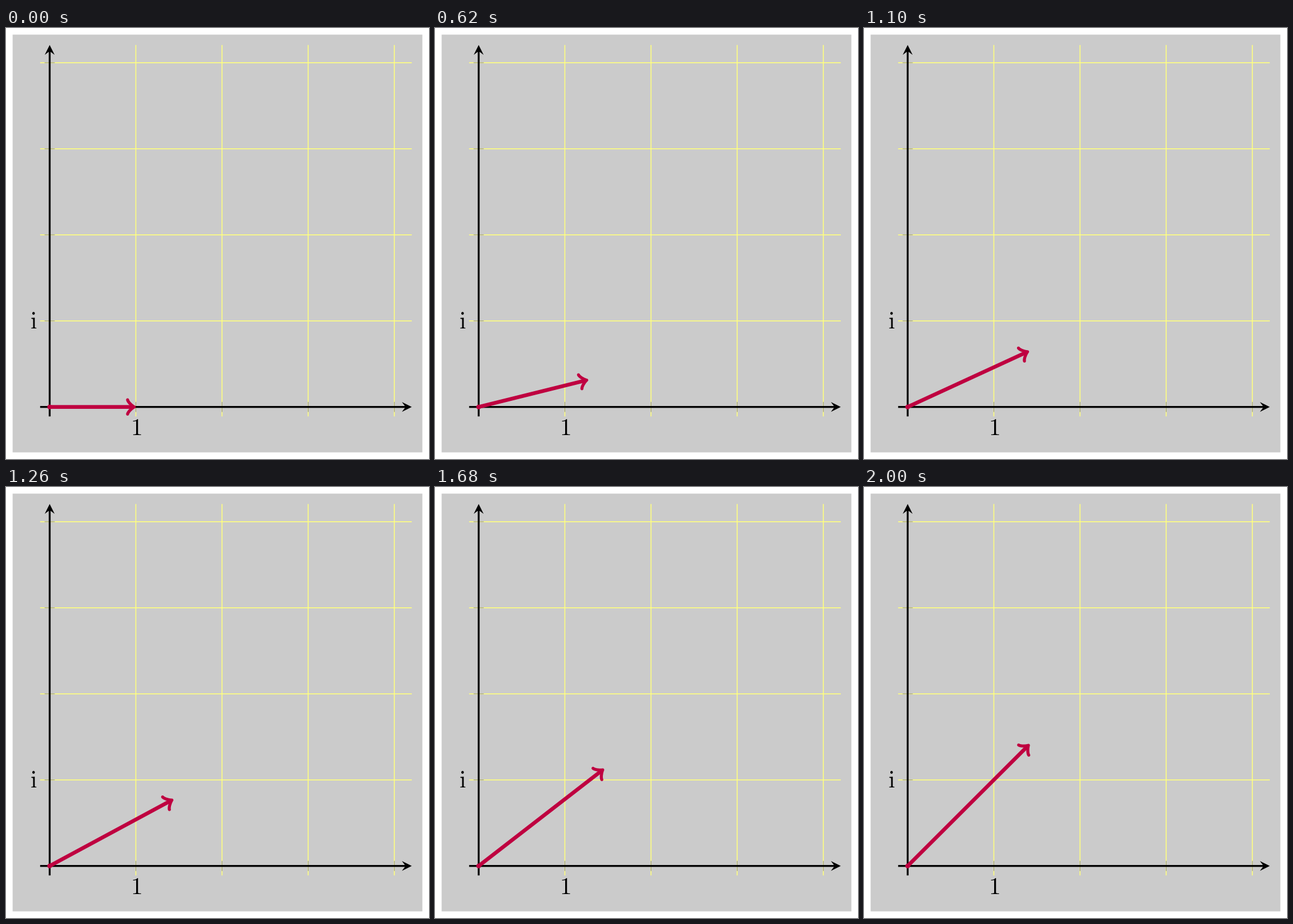
A matplotlib script that plays this animation: 741 by 756 pixels, repeating every 4 s.

```python
import numpy as np
import matplotlib.pyplot as plt
from matplotlib.animation import FuncAnimation
from matplotlib.patches import Circle, PathPatch, Polygon, Rectangle
from matplotlib.path import Path

W, H, DPI = 741, 756, 100
PT = 300 / 72.27                  # pixels per drawing point
OX, OY, UNIT = 76.5, 664.7, 150.95
LEFT, RIGHT, TOP, BOTTOM = 59.8, 710.8, 29.8, 681.3
MOVE, FRAMES, STEP = 100, 200, 20

RED = (0.75, 0, 0.25)
YELLOW = (1, 1, 0.5)
GRAY = (0.5, 0.5, 0.5)

plt.rcParams["mathtext.fontset"] = "cm"
plt.rcParams["path.snap"] = False

fig = plt.figure(figsize=(W / DPI, H / DPI), dpi=DPI, facecolor="white")
ax = fig.add_axes([0, 0, 1, 1])
ax.set_xlim(0, W)
ax.set_ylim(H, 0)
ax.axis("off")


def px(width):
    """Pixels to the points matplotlib measures in."""
    return width * 72 / DPI


def line(x0, y0, x1, y1, color, width, z):
    return ax.plot([x0, x1], [y0, y1], color=color, lw=px(width * PT),
                   solid_capstyle="butt", zorder=z, snap=False)[0]


def stealth(x, y, dx, dy):
    """Filled axis arrowhead with its tip at (x, y)."""
    a = (0.28 + 0.3 * 0.8) * PT
    shape = np.array([(0, 0), (-8, 4), (-5, 0), (-8, -4)]) * a
    turn = np.array([(dx, dy), (-dy, dx)])
    ax.add_patch(Polygon(shape @ turn + (x, y), fc="black", lw=0,
                         zorder=4, snap=False))


def label(x, y, text):
    ax.text(x, y, rf"$\mathrm{{{text}}}$", fontsize=px(10 * PT),
            ha="center", va="baseline", zorder=5)


ax.add_patch(Rectangle((11.6, 11.6), 717.8, 732.8, fc="#cbcbcb", lw=0,
                       zorder=0, snap=False))

tick = 8.87
for k in range(1, 5):
    x, y = OX + k * UNIT, OY - k * UNIT
    line(x, TOP, x, BOTTOM, YELLOW, 0.4, 1)
    line(LEFT, y, RIGHT, y, YELLOW, 0.4, 1)
    line(x, OY - tick, x, OY + tick, GRAY, 0.2, 2)
    line(OX - tick, y, OX + tick, y, GRAY, 0.2, 2)

line(LEFT, OY, RIGHT - 10, OY, "black", 0.8, 3)
line(OX, BOTTOM, OX, TOP + 10, "black", 0.8, 3)
stealth(RIGHT, OY, 1, 0)
stealth(OX, TOP, 0, -1)
label(OX + UNIT, 714, "1")
label(48, 527.3, "i")

# Moving vector: shaft, curved barbs and a dot at its foot
LW = 1.6
A = (0.28 + 0.3 * LW) * PT
INSET = (0.21 + 0.625 * LW) * PT
BARBS = np.array([(-3, 4), (-2.75, 2.5), (0, 0.25), (0.75, 0),
                  (0, -0.25), (-2.75, -2.5), (-3, -4)]) * A
CODES = [Path.MOVETO] + [Path.CURVE4] * 6

shaft = line(OX, OY, OX, OY, RED, LW, 6)
shaft.set_solid_capstyle("round")
head = PathPatch(Path(BARBS, CODES), fc="none", ec=RED,
                 lw=px(0.8 * LW * PT), capstyle="round",
                 joinstyle="round", zorder=6, snap=False)
ax.add_patch(head)
ax.add_patch(Circle((OX, OY), PT, fc=RED, lw=0, zorder=6, snap=False))


def draw(frame):
    t = min(frame / MOVE, 1)
    angle = t * np.pi / 4
    c, s = np.cos(angle), -np.sin(angle)
    reach = (1 + t) * UNIT - INSET
    end = np.array([OX + reach * c, OY + reach * s])
    shaft.set_data([OX, end[0]], [OY, end[1]])
    head.set_path(Path(BARBS @ np.array([(c, s), (-s, c)]) + end, CODES))
    return shaft, head


anim = FuncAnimation(fig, draw, frames=FRAMES, interval=STEP,
                     init_func=lambda: draw(0), repeat=True, repeat_delay=0)
plt.show()
```
